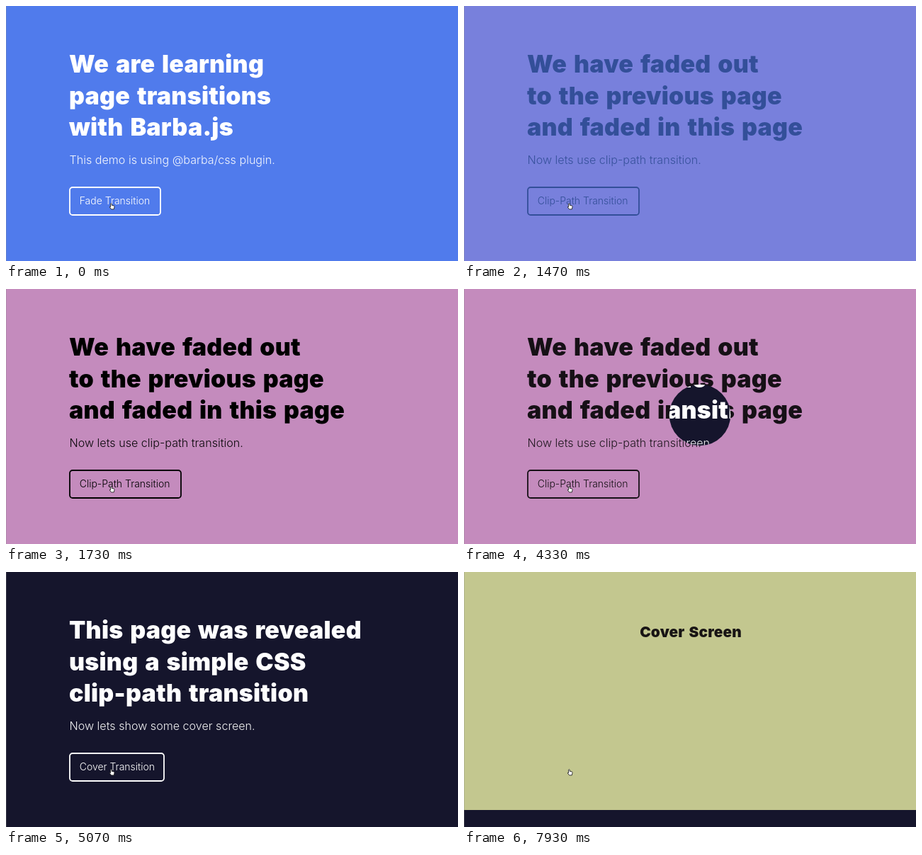
An HTML page that plays this animation: 638x360 px, repeating every 8000 ms.

```html
<!DOCTYPE html>
<html lang="en">
<head>
<meta charset="utf-8">
<title>Page transitions</title>
<style>
  html, body { margin: 0; width: 100%; height: 100%; overflow: hidden; background: #507bec; }
  svg { display: block; width: 638px; height: 360px; }
  text { font-family: Inter, "Open Sans", sans-serif; white-space: pre; }
  .title, .cover { font-weight: 900; letter-spacing: .007em; word-spacing: .08em; }
  .title { font-size: 34px; }
  .cover { font-size: 20.8px; text-anchor: middle; }
  .lead { font-size: 16.1px; font-weight: 300; }
  .label { font-size: 14px; font-weight: 300; }
</style>
</head>
<body>
<svg viewBox="0 0 638 360">
  <defs><clipPath id="hole"><circle id="circle" cx="333" cy="178" r="0"/></clipPath></defs>
  <rect id="base" width="638" height="360"/>
  <g id="blue"></g>
  <g id="pink"><rect width="638" height="360" fill="#c48bbd"/><g id="pinkText"></g></g>
  <g id="night" clip-path="url(#hole)"><rect width="638" height="360" fill="#15152c"/><g id="nightText"></g></g>
  <g id="cover">
    <rect id="sheet" y="-400" width="638" height="400"/>
    <text class="cover" x="320" y="-244" fill="#181414">Cover Screen</text>
  </g>
  <rect width="1" height="360" fill="#888" opacity=".3"/>
  <path d="M147.6 283.6V279.2Q148.4 277.9 149.2 279.2V281.2L152.2 281.9Q153.2 282.2 153 283.4L152.3 286.9H148.6L146.3 284Q146.2 282.7 147.6 283.6Z"
        fill="#fff" stroke="#222" stroke-width=".9" stroke-linejoin="round"/>
</svg>
<script>
const LOOP = 8000, FRAME = 1000 / 15;
const el = id => document.getElementById(id);

function fill(id, color, lines, lead, label, width) {
  const titles = lines.map((s, i) =>
    `<text class="title" x="89" y="${94 + i * 44.7}">${s}</text>`).join('');
  el(id).setAttribute('fill', color);
  el(id).innerHTML = titles +
    `<text class="lead" x="89.5" y="222.7" opacity=".94">${lead}</text>
     <rect x="90" y="256" width="${width}" height="39" rx="4" fill="none" stroke="${color}" stroke-width="1.8"/>
     <text class="label" x="103.7" y="280">${label}</text>`;
}

fill('blue', '#fff', ['We are learning', 'page transitions', 'with Barba.js'],
  'This demo is using @barba/css plugin.', 'Fade Transition', 128);
fill('pinkText', '#000', ['We have faded out', 'to the previous page', 'and faded in this page'],
  'Now lets use clip-path transition.', 'Clip-Path Transition', 157);
fill('nightText', '#fff', ['This page was revealed', 'using a simple CSS', 'clip-path transition'],
  'Now lets show some cover screen.', 'Cover Transition', 133);

// CSS "ease": cubic-bezier(.25, .1, .25, 1)
function ease(x) {
  if (x <= 0) return 0;
  if (x >= 1) return 1;
  let lo = 0, hi = 1;
  for (let i = 0; i < 24; i++) {
    const s = (lo + hi) / 2;
    if (.75 * s * (1 - s) + s ** 3 < x) lo = s; else hi = s;
  }
  return .3 * lo * (1 - lo) ** 2 + 3 * lo * lo * (1 - lo) + lo ** 3;
}

function draw(now) {
  // The picture advances at 15 frames per second.
  const t = Math.floor((now % LOOP + 4) / FRAME) * FRAME;
  const part = (start, length) => ease((t - start) / length);
  const reveal = part(4256, 700), push = part(7724, 306);

  el('base').setAttribute('fill', t < 1800 ? '#507bec' : '#c48bbd');
  el('blue').setAttribute('opacity', 1 - part(1110, 290));
  el('pink').setAttribute('opacity', part(1390, 340));
  el('pinkText').setAttribute('opacity', 1 - reveal);
  el('circle').setAttribute('r', 388 * reveal);
  el('nightText').setAttribute('transform', `translate(0 ${Math.round(360 * push)})`);

  const edge = Math.round(365 * push - 5);
  el('cover').setAttribute('transform', `translate(0 ${edge})`);
  el('sheet').setAttribute('fill', edge < 3 ? '#2eab34' : '#c3c78f');
}

const begin = performance.now();
function tick() {
  draw(performance.now() - begin);
  requestAnimationFrame(tick);
}
tick();
</script>
</body>
</html>
```
